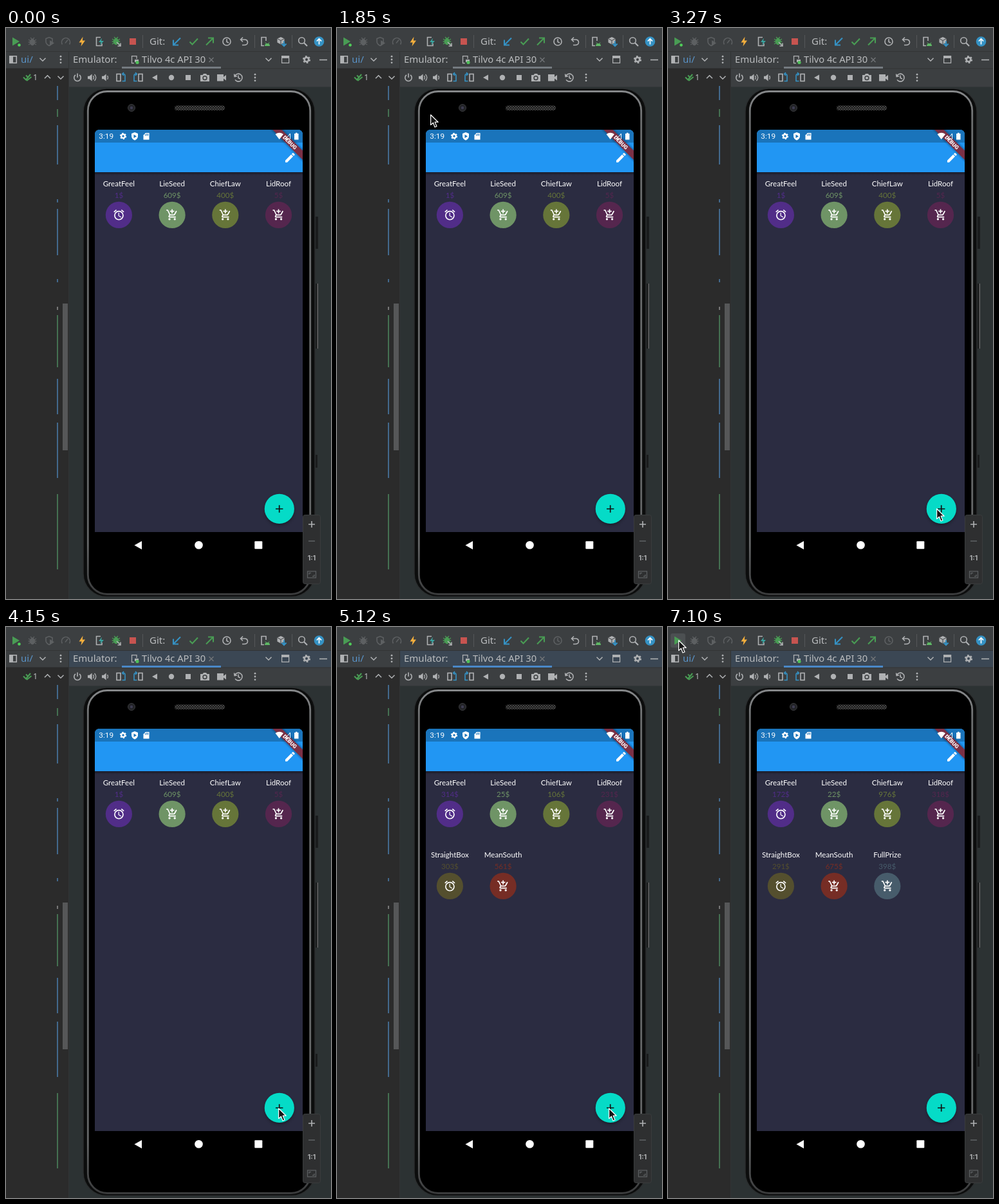
Recreate the animation shown at these times as an HTML page. Size 505 px wide and 887 px high, loop 8000 ms.

```html
<!DOCTYPE html>
<html lang="en">
<head>
<meta charset="utf-8">
<title>Emulator demo</title>
<style>
html, body { margin: 0; width: 100%; height: 100%; overflow: hidden; background: #2c3233; }
svg { display: block; width: 100%; height: 100%; }
.ide { font: 15px "Noto Sans", "Open Sans", sans-serif; fill: #bbbdbf; }
.l { fill: none; stroke: #afb1b3; stroke-width: 1.6; }
.thin { stroke-width: 1.25; }
.thick { stroke-width: 2.1; }
.f { fill: #afb1b3; }
.dim { stroke: #5d6062; }
.blue { stroke: #3592c4; }
.green { stroke: #499c54; }
.item { font: 11.6px Lato, sans-serif; text-anchor: middle; }
.white { fill: #fff; }
#header { fill: #3c3f41; }
#underline { fill: #747a80; }
.focused #header { fill: #3b4754; }
.focused #underline { fill: #4a88c7; }
</style>
</head>
<body>
<svg id="stage" viewBox="0 0 505 887">
<defs>
  <path id="chev" d="M-4.5-2.3 0 2.2 4.5-2.3"/>
  <g id="kebab"><circle cy="-4.8" r="1.4"/><circle r="1.4"/><circle cy="4.8" r="1.4"/></g>
  <g id="gear" fill="none"><circle r="3.3" stroke-width="2.6"/><circle r="5" stroke-width="2.2" stroke-dasharray="2.62"/></g>
  <g id="bug"><ellipse cy="1" rx="3.6" ry="4.8"/><path d="M-6-3 6 5M6-3-6 5M-6.3 1H6.3M-3-6 0-3 3-6" fill="none" stroke-width="1.3"/></g>
  <path id="clock" d="M-5.6-2A6 6 0 1 1-5 3.4M-6.4-5.5-5.8-1.4-2-2.2M0-3.5V.5L3 2"/>
  <g id="speaker"><path d="M-6-2.2H-3.3L.6-5.6V5.6L-3.3 2.2H-6Z" class="f"/><path d="M2.5-2.8Q4.4 0 2.5 2.8" class="l thin"/></g>
  <g id="turn"><rect x="-7" y="-5.5" width="6" height="11" class="l"/><path d="M1.5 5.5H6V-2.5M2-5.5H4Q6-5.5 6-2.5M4-8 1.7-5.5 4-3" class="l blue"/></g>
  <path id="alarm" d="M22 5.7l-4.6-3.8-1.3 1.5 4.6 3.9zM7.9 3.4 6.6 1.9 2 5.7l1.3 1.5zM12.5 8H11v6l4.8 2.9.7-1.3-4-2.4zM12 4a9 9 0 1 0 0 18 9 9 0 0 0 0-18zm0 16a7 7 0 1 1 0-14 7 7 0 0 1 0 14z"/>
  <path id="cart" d="M11 9h2V6h3V4h-3V1h-2v3H8v2h3zM7 18a2 2 0 1 0 0 4 2 2 0 0 0 0-4zm10 0a2 2 0 1 0 0 4 2 2 0 0 0 0-4zm-9.8-3.2.9-1.8h7.4c.8 0 1.4-.4 1.8-1l3.9-7-1.8-1-3.9 7H8.5L4.3 2H1v2h2l3.6 7.6-1.4 2.4c-.7 1.4.3 3 1.8 3h12v-2H7.4z"/>
  <linearGradient id="metal" x2="0" y2="1"><stop stop-color="#858789"/><stop offset=".06" stop-color="#6c6e6f"/><stop offset=".9" stop-color="#646667"/><stop offset="1" stop-color="#3a3b3c"/></linearGradient>
  <linearGradient id="fade" x2="0" y2="1"><stop stop-opacity=".4"/><stop offset="1" stop-opacity="0"/></linearGradient>
  <pattern id="mesh" width="4" height="4" patternUnits="userSpaceOnUse"><path d="M0 0 4 4M4 0 0 4" stroke="#4a4a4a" stroke-width=".9"/></pattern>
  <filter id="soft" x="-30%" y="-30%" width="160%" height="160%"><feGaussianBlur stdDeviation="2.5"/></filter>
  <clipPath id="screen"><path d="M138 783V166q0-8 8-8H453q8 0 8 8V783Z"/></clipPath>
</defs>

<!-- IDE surfaces -->
<rect width="505" height="887" fill="#2c3233"/>
<rect width="98" height="887" fill="#2b2b2b"/>
<rect width="505" height="63" fill="#3c3f41"/>
<rect id="header" x="98" y="37" width="407" height="26"/>
<rect x="98" y="63" width="407" height="28.5" fill="#3c3f41"/>
<path d="M0 36.5H505M97.5 37V887M98 63H505M0 62.5H98" stroke="#323435" fill="none"/>
<rect id="underline" x="180" y="60" width="154" height="3"/>
<rect x="88" y="428" width="8" height="228" fill="#565758"/>
<g fill="none" stroke-width="2">
  <path stroke="#43698d" d="M80 90V112M80 151V212M80 266V271M80 281V353M80 390V395M80 545V600M80 613V699"/>
  <path stroke="#447152" d="M80 126V138M80 446V527M80 724V841"/>
  <path stroke="#777" d="M80 433V438"/>
</g>

<!-- main toolbar -->
<rect id="hover" x="4" y="10" width="23" height="22" rx="3" fill="#4c5052"/>
<path d="M10 14.5 21 21 10 27.5Z" fill="#499c54"/><circle cx="20.5" cy="26.5" r="2.3" fill="#50d05a"/>
<use href="#bug" x="41" y="21" fill="#5d6062" stroke="#5d6062"/>
<path class="l dim" d="M62 16.5 67 14.5 72 16.5V21Q72 25 67 27.5 62 25 62 21Z"/><path d="M68 19 75 23.5 68 28Z" fill="#5d6062"/>
<path class="l dim" d="M87.5 25.5A6.5 6.5 0 1 1 98.5 25.5M92 23.5 96 18.5"/>
<path d="M119.5 13.5 113.5 22.5H117.5L116.5 28.5 123 19.5H118.8Z" fill="#f4af3d"/>
<path class="l" d="M147 14.5H140.5V27.5H149V24"/><path d="M149 15.5 144 22H147.5L146 27 152 20H148Z" fill="#3aa5a0"/>
<use href="#bug" x="171" y="20" fill="#499c54" stroke="#499c54"/><path class="l" d="M172 22 178 28M178 23.5V28H173.5"/>
<rect x="192" y="16" width="10" height="10" fill="#c75450"/>
<path d="M212.5 11V31M386.5 11V31M444.5 11V31" stroke="#555759"/>
<text class="ide" x="223" y="26">Git:</text>
<path class="l blue thick" d="M271 15.5 260.5 26M260 18.5V26.5H268"/>
<path class="l green thick" d="M285.5 21.5 289.5 25.5 298 16.5"/>
<path class="l green thick" d="M311 26.5 321.5 16M314 15.5H322V23.5"/>
<g id="history" class="l"><circle cx="343" cy="21" r="6"/><path d="M343 17V21.5L346 23"/></g>
<path class="l" d="M368 14.5 364.5 18 368 21.5M364.5 18H371.5Q375.5 18.5 375.5 22.5 375 26.5 370 26.5H367"/>
<path class="l" d="M404 20V14.5H397V27.5H401"/><path d="M402 28A4 4 0 0 1 410 28Z" fill="#5fb865"/><path d="M403 22.5 405 25M409 22.5 407 25" stroke="#5fb865"/>
<path d="M427 14 432.5 16.5V22.5L427 25.5 421.5 22.5V16.5Z" class="f"/><path d="M421.5 16.5 427 19.5 432.5 16.5M427 19.5V25" stroke="#3c3f41" fill="none"/><path class="l blue thick" d="M432 20.5V27.5M428.5 24.5 432 28 435.5 24.5"/>
<circle class="l" cx="459.5" cy="19.5" r="4.8"/><path class="l thick" d="M463 23 468 28"/>
<circle cx="486.5" cy="21" r="7.8" fill="#3592c4"/><path d="M486.5 25.5V17M482.8 20.5 486.5 16.8 490.2 20.5" fill="none" stroke="#fff" stroke-width="1.7"/>

<!-- panel headers -->
<rect class="l" x="5.8" y="43.8" width="10.5" height="10.5"/><path class="f" d="M6 44H11V54H6Z"/>
<text class="ide" x="23" y="54" style="fill:#5a93c8">ui/</text>
<use href="#chev" x="57" y="49" class="l"/><use href="#kebab" x="85" y="49" class="f"/>
<text class="ide" x="104" y="54">Emulator:</text>
<path class="l thin" d="M203 48V43.5H195.5V54.5H199"/><path class="f" d="M200 49H206V53H200Z"/><circle cx="204" cy="53.5" r="2.6" fill="#50c05a"/>
<text class="ide" x="211" y="54" style="font-size:14.7px">Tilvo 4c API 30</text>
<path class="l thin" style="stroke:#74777a" d="M315.5 46 322.5 53M322.5 46 315.5 53"/>
<use href="#chev" x="408" y="49" class="l"/>
<rect class="l thin" x="428.6" y="43.8" width="11" height="10.5"/><path class="f" d="M428 43H440V47H428Z"/>
<use href="#gear" x="467" y="49" stroke="#afb1b3"/><path class="l" d="M487 49.5H499"/>

<!-- emulator toolbar -->
<path class="l green thick" d="M27 76.5 31 80.5 38 72M31 73.5 34.5 77M32 82 39.5 76"/>
<text class="ide" x="42" y="81" style="font-size:12.5px">1</text>
<use href="#chev" transform="translate(64.5 76)scale(1 -1)" class="l"/><use href="#chev" x="85" y="77" class="l"/>
<path class="l" d="M108 73A5.2 5.2 0 1 0 114 73M111 70.5V77"/>
<use href="#speaker" x="133" y="77"/><path class="l thin" d="M137.5 72Q142 77 137.5 82"/>
<use href="#speaker" x="155" y="77"/>
<use href="#turn" x="179" y="77"/><use href="#turn" transform="translate(205 77)scale(-1 1)"/>
<path class="f" d="M227 77 235 72.5V81.5Z"/><circle class="f" cx="257" cy="77" r="4.2"/><rect class="f" x="279" y="73" width="8" height="8"/>
<path class="f" d="M302 73H305.5L307 71H311L312.5 73H316V83H302Z"/><circle cx="309" cy="77.7" r="2.9" fill="#afb1b3" stroke="#3c3f41" stroke-width="1.5"/>
<path class="f" d="M328 72H338V76L342 73V81.5L338 78.5V82.5H328Z"/>
<use href="#clock" x="361" y="77" class="l"/><use href="#kebab" x="387" y="77" class="f"/>

<!-- phone -->
<path d="M481 293H485V343H481ZM481 397H485V498H481ZM481 663H484V683H481Z" fill="#1a1c1d"/>
<path d="M484.3 397V498" stroke="#777" stroke-width="1.2"/>
<rect x="120" y="94" width="360" height="789.5" rx="36" fill="#0c0d0d" stroke="#2b2e2f" stroke-width="1.5"/>
<rect x="127.3" y="98.5" width="345.4" height="781" rx="30" stroke="url(#metal)" stroke-width="2.8"/>
<circle cx="195" cy="124" r="5.5" fill="#222327" stroke="#38393c"/><circle cx="195" cy="124" r="2.2" fill="#3d3c50"/>
<rect x="262" y="120.5" width="78" height="7.5" rx="3.7" fill="#1b1b1b"/><rect x="262" y="120.5" width="78" height="7.5" rx="3.7" fill="url(#mesh)"/>

<g clip-path="url(#screen)">
  <rect x="138" y="158" width="323" height="625" fill="#2b2c41"/>
  <rect x="138" y="224" width="323" height="5" fill="url(#fade)"/>
  <rect x="138" y="158" width="323" height="66" fill="#2196f3"/>
  <rect x="138" y="158" width="323" height="20" fill="#1a74bb"/>
  <path class="white" transform="translate(431.5 191.5)scale(.82)" d="M3 17.25V21H6.75L17.8 9.9 14.1 6.2ZM20.7 7a1 1 0 0 0 0-1.4L18.4 3.3a1 1 0 0 0-1.4 0L15.1 5.1 18.9 8.9Z"/>
  <g transform="translate(461 158)rotate(45)">
    <rect x="-40" y="23" width="80" height="10" opacity=".5" filter="url(#soft)"/>
    <rect x="-40" y="23" width="80" height="10" fill="#7b3045"/>
    <text y="31" text-anchor="middle" class="white" style="font:900 8.4px Roboto,sans-serif">DEBUG</text>
  </g>
  <g class="white">
    <text x="144.3" y="172.3" style="font:11.8px Roboto,sans-serif">3:19</text>
    <use href="#gear" transform="translate(182 168)scale(.85)" stroke="#fff"/>
    <path d="M200 162 205 164V168Q205 172 200 174.5 195 172 195 168V164Z"/><path d="M198.5 165.5 203 168.2 198.5 171Z" fill="#1a74bb"/>
    <path d="M217 163H222.5V173.5H213.5V166.5Z"/><path d="M216.5 165V167.5M218.5 164V167.5M220.5 164V167.5" stroke="#1a74bb"/>
    <path d="M418.5 165Q424.7 160.5 431 165L424.7 173Z"/>
    <path d="M434.5 172.5 441.5 164V172.5Z" fill="none" stroke="#fff"/>
    <path d="M448 164H450V162.7H452.5V164H454.5V173.5H448Z"/>
  </g>
  <g id="items"></g>
  <circle cx="424.8" cy="749.5" r="22.5" opacity=".38" filter="url(#soft)"/>
  <circle cx="424.8" cy="746.9" r="23.1" fill="#05dbc7"/>
  <circle id="ripple" cx="424.8" cy="746.9" fill="#c8c8c8"/>
  <path d="M424.7 741.3V752.7M419 747H430.4" stroke="#111" stroke-width="1.7"/>
</g>
<g class="white"><path d="M199.5 803.5 211 797V810Z"/><circle cx="299.5" cy="803.3" r="6.3"/><rect x="386.3" y="797.3" width="12" height="12" rx="1"/></g>

<!-- zoom controls -->
<rect x="461.5" y="756.5" width="27" height="107" rx="3" fill="#2e2f30" stroke="#3a3c3d"/>
<path class="l" d="M475 766V776M470 771H480"/><path class="l dim" d="M470 797H480"/>
<text x="475" y="827" text-anchor="middle" class="f" style="font:bold 10.5px Inter,sans-serif">1:1</text>
<rect class="l dim thin" x="468.5" y="844" width="13" height="10"/><path class="l dim thin" d="M471 849V846.5H474M479 849V851.5H476"/>

<g id="cursor" fill="#151515" stroke="#fff" stroke-width="1.2" stroke-linejoin="round">
  <path id="arrow" d="M.6.8V16.6L4.4 13.2 7 20 10 18.8 7.2 12.2H12.2Z"/>
  <path id="resize" d="M-11.5 0-5.5-5.5V-1.5H5.5V-5.5L11.5 0 5.5 5.5V1.5H-5.5V5.5Z"/>
</g>
</svg>
<script>
const LOOP = 8000, STEP = 78;
const $ = id => document.getElementById(id);

const menu = [
  ["GreatFeel", "#512d88", "alarm"], ["LieSeed", "#6f9466", "cart"],
  ["ChiefLaw", "#667539", "cart"], ["LidRoof", "#55264e", "cart"],
  ["StraightBox", "#544f2e", "alarm"], ["MeanSouth", "#762d25", "cart"],
  ["FullPrize", "#475c6b", "cart"]
];
// Each tap adds an item and rerolls every price.
const rolls = [
  { at: 0, prices: [1, 609, 400, 5] },
  { at: 4230, prices: [187, 412, 263, 150, 520] },
  { at: 4890, prices: [314, 25, 106, 231, 303, 561] },
  { at: 5680, prices: [172, 22, 976, 318, 291, 675, 398] }
];
// Cursor moves: start time, step count, then start, bend and end points.
const moves = [
  [420, 3, [227, 285], [300, 306], [366, 326]],
  [660, 1, [280, 291]],
  [820, 2, [240, 287], [220, 285], [201, 284]],
  [1050, 2, [150, 284], [130, 284], [110, 284]],
  [1380, 10, [114, 274], [200, 160], [98, 72]],
  [2160, 1, [94, 62]],
  [2260, 2, [93, 61], [92, 60], [92, 60]],
  [2490, 11, [124, 120], [330, 560], [417, 746]],
  [3360, 4, [419, 746], [421, 747], [423, 747]],
  [4810, 1, [422, 747]],
  [6070, 3, [405, 680], [330, 400], [262, 168]],
  [6300, 8, [215, 125], [90, 50], [16, 20]]
];

$("items").innerHTML = menu.map(([name, color, icon], i) => {
  const x = 175.4 + 82.7 * (i % 4), y = 290.4 + 112 * (i >> 2);
  return `<g class="item" transform="translate(${x} ${y})">
    <text y="-44" fill="#fff">${name}</text><text class="price" y="-26.5" fill="${color}"></text>
    <circle r="20.6" fill="${color}"/><use href="#${icon}" fill="#fff" transform="scale(.82)translate(-12 -12)"/></g>`;
}).join("");
const items = [...document.querySelectorAll(".item")];

const latest = (list, time, t) => list.filter(e => time(e) <= t).pop();
const show = (id, on) => $(id).setAttribute("visibility", on ? "visible" : "hidden");

function drawCursor(t) {
  const move = latest(moves, m => m[0], t);
  show("cursor", move);
  if (!move) return;
  const [start, count, a, b = a, c = a] = move;
  const k = Math.min(count - 1, Math.floor((t - start) / STEP));
  const u = count > 1 ? k / (count - 1) : 0, v = 1 - u;
  const [x, y] = [0, 1].map(i => Math.round(v * v * a[i] + 2 * u * v * b[i] + u * u * c[i]));
  const resizing = t >= 2160 && t < 2490;
  $("cursor").setAttribute("transform", `translate(${x} ${y})`);
  $("arrow").style.display = resizing ? "none" : "inline";
  $("resize").style.display = resizing ? "inline" : "none";
}

function drawItems(t) {
  const { at, prices } = latest(rolls, r => r.at, t);
  items.forEach((item, i) => {
    item.style.display = i < prices.length ? "inline" : "none";
    item.querySelector(".price").textContent = prices[i] + "$";
  });
  const k = Math.floor((t - at) / STEP);
  $("ripple").setAttribute("r", at && k < 2 ? 14 + 8 * k : 0);
  $("ripple").setAttribute("opacity", k ? .12 : .22);
}

function frame() {
  const t = performance.now() % LOOP;
  $("stage").classList.toggle("focused", t >= 4070);
  $("history").classList.toggle("dim", t >= 4310);
  show("hover", t >= 6780);
  drawItems(t);
  drawCursor(t);
  requestAnimationFrame(frame);
}
frame();
</script>
</body>
</html>
```
